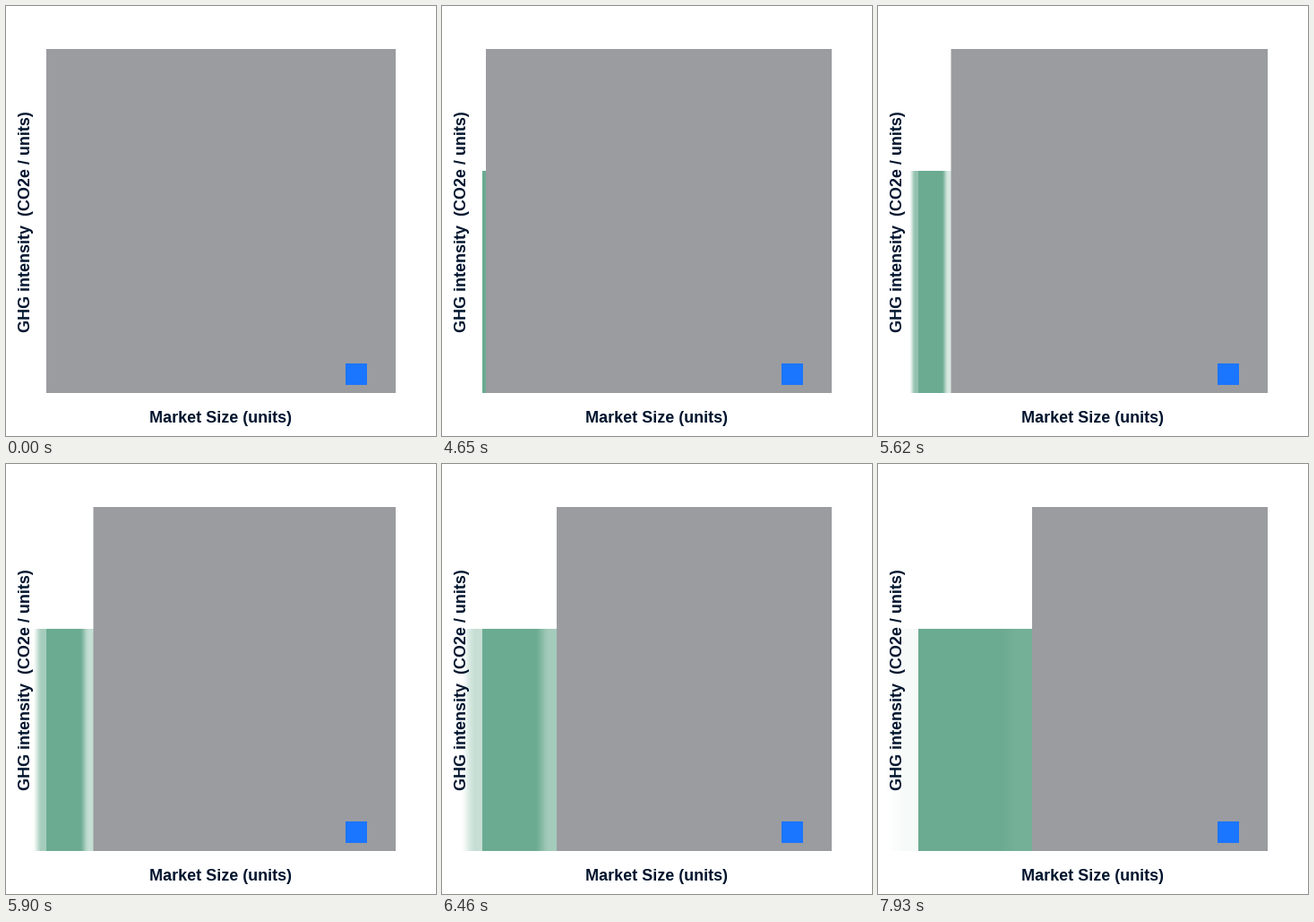
A matplotlib script for the animation above (8 s loop, 480x480 px).

```python
import numpy as np
import matplotlib.pyplot as plt
from matplotlib.animation import FuncAnimation
from matplotlib.patches import Rectangle

SIZE, DPI = 480, 80
PX = 72 / DPI                      # points per pixel
STEP, LOOP = 20, 8000              # ms

LEFT, TOP, RIGHT, BOTTOM = 45, 48, 435, 432
GREEN_TOP = 184
NAVY, GRAY, BLUE = "#00142d", "#9b9ca0", "#1a75ff"
GREEN = np.array([107, 171, 145]) / 255

LABEL_ON, LABEL_OFF, SLIDE_START, SLIDE_STEP = 500, 4650, 4850, 70

# Left edge of the gray block against the slide step
KEYS = np.array([-1, 6, 11, 15, 23, 35, 44])
EDGES = np.array([49, 62, 81.5, 97.5, 128, 160, 172])
SLOPES = np.gradient(EDGES, KEYS, edge_order=2)

fig = plt.figure(figsize=(SIZE / DPI, SIZE / DPI), dpi=DPI, facecolor="white")
ax = fig.add_axes([0, 0, 1, 1])
columns = np.arange(SIZE) + 0.5


def smooth(u):
    u = np.clip(u, 0, 1)
    return u * u * (3 - 2 * u)


def gray_edge(k):
    """Cubic Hermite curve through the keys."""
    i = min(np.searchsorted(KEYS, k, side="right") - 1, len(KEYS) - 2)
    h = KEYS[i + 1] - KEYS[i]
    u = (k - KEYS[i]) / h
    s = smooth(u)
    return (EDGES[i] * (1 - s) + EDGES[i + 1] * s
            + h * SLOPES[i] * u * (1 - u) ** 2
            - h * SLOPES[i + 1] * u * u * (1 - u))


def ramp(end, width):
    """Rise over the columns before end, levelling off ahead of it."""
    return smooth(1.45 * (columns - end + width) / width)


def green_band(edge):
    """One row of RGBA: solid green, feathered on both sides."""
    grown = edge - LEFT
    feather = max(0.31 * (grown - 3), 0.01)
    fade = 1 - 0.0074 * grown
    outer = fade * ramp(LEFT, feather)
    inner = 1 - fade * ramp(edge, feather)
    row = np.zeros((1, SIZE, 4))
    row[..., :3] = GREEN
    row[0, :, 3] = np.where(columns < LEFT, outer,
                            np.where(columns < edge + 1, inner, 0))
    return row


def label(x, y, text, family="Liberation Sans", weight="bold", size=18, **kw):
    return ax.text(x, y, text, family=family, weight=weight, size=size * PX,
                   color=NAVY, va="baseline", zorder=5, **kw)


def light_label(x, y, text):
    return label(x, y, text, "DejaVu Sans", "normal", 16.1)


band = ax.imshow(np.zeros((1, SIZE, 4)), extent=(0, SIZE, BOTTOM, GREEN_TOP),
                 aspect="auto", interpolation="nearest", zorder=1)
ax.set(xlim=(0, SIZE), ylim=(SIZE, 0))
ax.axis("off")

block = ax.add_patch(Rectangle((LEFT, TOP), RIGHT - LEFT, BOTTOM - TOP,
                               fc=GRAY, lw=0, snap=False, zorder=2))
border = ax.add_patch(Rectangle((LEFT, TOP), RIGHT - LEFT, BOTTOM - TOP,
                                fill=False, ec=NAVY, lw=2 * PX, zorder=3))
ax.add_patch(Rectangle((379, 399), 24, 24, fc=BLUE, lw=0, zorder=4))

label(239, 465, "Market Size (units)", ha="center")
label(27, 241, "GHG intensity  (CO2e / units)", ha="center", rotation=90,
      rotation_mode="anchor")

caption = [
    border,
    light_label(305, 68, "Total"),
    label(349.5, 68, "baseline"),
    light_label(304.5, 89, "emissions"),
]


def update(n):
    t = n * STEP + STEP / 2
    for artist in caption:
        artist.set_visible(LABEL_ON <= t < LABEL_OFF)

    sliding = t >= LABEL_OFF
    edge = LEFT
    if sliding:
        edge = gray_edge(max((t - SLIDE_START) // SLIDE_STEP, -1))
        band.set_data(green_band(edge))
    band.set_visible(sliding)
    block.set_x(edge)
    block.set_width(RIGHT - edge)
    return [band, block, *caption]


anim = FuncAnimation(fig, update, frames=LOOP // STEP, interval=STEP,
                     repeat=True, repeat_delay=0)
plt.show()
```
